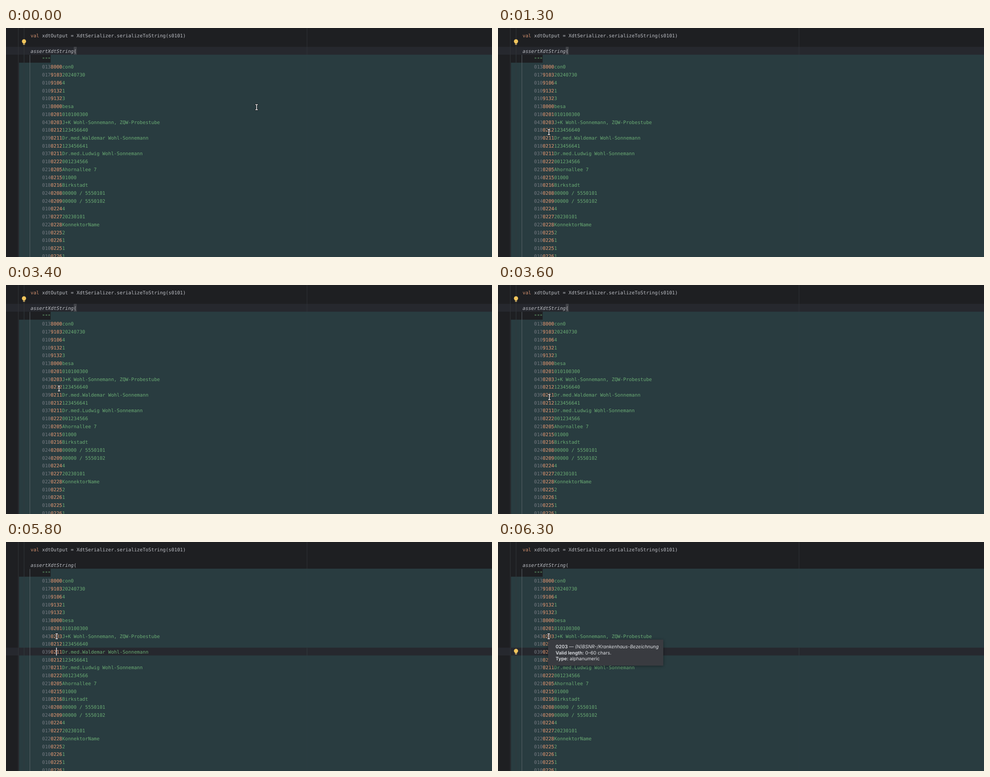
An HTML page for the animation above (8000 ms loop, 1088 by 515 pixels).

```html
<!DOCTYPE html>
<html lang="en">
<head>
<meta charset="utf-8">
<title>Editor hover</title>
<style>
  html, body { margin: 0; width: 100%; height: 100%; overflow: hidden; background: #1e1f22; }
  svg { display: block; width: 1088px; height: 515px; }
  text { white-space: pre; text-rendering: geometricPrecision; }
  #code { font: 10.69px "DejaVu Sans Mono", monospace; fill: #bcbec4; }
  #code .kw { fill: #cf8e6d; }
  #code .id { fill: #cf8e6d; stroke: #cf8e6d; stroke-width: .2; }
  #code .len { fill: #747980; }
  #code .str { fill: #6aab73; }
  #code .fn { font-style: italic; }
  #tip text { font: 10.5px Inter, sans-serif; fill: #dfe1e5; }
  #tip .b { font-weight: 600; }
  #tip .i { font-style: italic; }
</style>
</head>
<body>
<svg viewBox="0 0 1088 515">
  <defs>
    <filter id="soft" x="-10%" y="-30%" width="120%" height="160%">
      <feGaussianBlur stdDeviation="3.5"/>
    </filter>
    <path id="beam" d="M-2 -5.8H-1Q0 -5.8 0 -4.8V4.8Q0 5.8 -1 5.8H-2M2 -5.8H1Q0 -5.8 0 -4.8V4.8Q0 5.8 1 5.8H2"/>
  </defs>
  <rect width="1088" height="515" fill="#1e1f22"/>
  <path d="M100 60H1088V515H29V78H100Z" fill="#293c40"/>
  <rect id="row" width="1088" height="17.6" fill="#26282e"/>
  <g fill="none" stroke="#313438">
    <path d="M27.5 0V515M40.5 0V60M673.9 0V60"/>
    <path d="M40.5 60V515" stroke="#30393d"/>
    <path d="M673.9 60V515" stroke="#2d3f43"/>
    <path id="margin" d="M673.9 237.6V255.2"/>
    <path d="M53.5 60.5V515" stroke="#5a6267"/>
  </g>
  <rect id="brace" x="151.6" y="42.4" width="6.6" height="17.6" fill="#43454a"/>
  <g id="code"></g>
  <rect id="caret" x="112" y="237.6" width="1.8" height="17.6" fill="#ced0d6"/>
  <g id="bulb">
    <path d="M40.3 25.3a4.7 4.7 0 0 1 2.4 8.7v1.2h-4.8v-1.2a4.7 4.7 0 0 1 2.4-8.7Z" fill="#f2c55c"/>
    <path d="M38 36h4.6v.7q0 1.1-1.1 1.1h-2.4q-1.1 0-1.1-1.1Z" fill="#d8b56a"/>
  </g>
  <g id="tip">
    <rect x="112" y="221" width="258" height="58" fill="#000" opacity=".4" filter="url(#soft)"/>
    <rect x="112" y="219.5" width="258" height="58.5" fill="#393b40"/>
    <text x="129" y="238.9"><tspan class="b">0203</tspan> — <tspan class="i">(N)BSNR-/Krankenhaus-Bezeichnung</tspan></text>
    <text x="129" y="252.6"><tspan class="b">Valid length:</tspan> 0–60 chars.</text>
    <text x="129" y="266.3"><tspan class="b">Type:</tspan> alphanumeric</text>
  </g>
  <g id="mouse" fill="none" stroke-linecap="square">
    <use href="#beam" stroke="#101214" stroke-width="3.2"/>
    <use href="#beam" stroke="#fff" stroke-width="1.5"/>
  </g>
</svg>
<script>
const LOOP = 8000, STEP = 100, LEFT = 55, CHAR = 6.436, LINE = 17.72, BASE = 20.6;
const $ = id => document.getElementById(id);

const records = `0138000con0
017910320240730
01091064
01091321
01091323
0138000besa
0180201010100300
0430203J+K Wohl-Sonnemann, ZQW-Probestube
0180212123456640
0390211Dr.med.Waldemar Wohl-Sonnemann
0180212123456641
0370211Dr.med.Ludwig Wohl-Sonnemann
0180222001234566
0210205Ahornallee 7
014021501000
0180216Birkstadt
024020800000 / 5550101
024020900000 / 5550102
01002244
017022720230101
0220228KonnektorName
01002252
01002261
01002251
01002261`.split("\n");

function put(row, col, str, cls) {
  const el = document.createElementNS("http://www.w3.org/2000/svg", "text");
  el.setAttribute("x", LEFT + col * CHAR);
  el.setAttribute("y", BASE + row * LINE);
  if (cls) el.setAttribute("class", cls);
  el.textContent = str;
  $("code").append(el);
}

put(0, 0, "val", "kw");
put(0, 4, "xdtOutput = XdtSerializer.serializeToString(s0101)");
put(2, 0, "assertXdtString", "fn");
put(2, 15, "(");
put(3, 4, '"""', "str");
records.forEach((r, i) => {
  put(i + 4, 4, r.slice(0, 3), "len");
  put(i + 4, 7, r.slice(3, 7), "id");
  put(i + 4, 11, r.slice(7), "str");
});

// Pointer moves: each eases from the last place to x, y
const moves = [
  { from: 200, to: 400, x: 549, y: 180 },
  { from: 500, to: 1300, x: 114, y: 234 },
  { from: 1300, to: 1500, x: 96, y: 229 },
  { from: 1500, to: 1700, x: 120, y: 226 },
  { from: 3300, to: 3600, x: 115, y: 252 },
  { from: 5200, to: 5800, x: 113.5, y: 212 }
];

const clamp = v => Math.min(1, Math.max(0, v));
const ease = p => p * p * (3 - 2 * p);

function pointer(t) {
  let x = 561, y = 178;
  for (const m of moves) {
    const p = ease(clamp((t - m.from) / (m.to - m.from)));
    x += (m.x - x) * p;
    y += (m.y - y) * p;
  }
  return [x, y];
}

const show = (id, opacity) => $(id).setAttribute("opacity", +opacity);
const move = (id, x, y) => $(id).setAttribute("transform", `translate(${x} ${y})`);

function draw(time) {
  const t = Math.floor(time / STEP) * STEP;
  const clicked = t >= 5200, hover = t >= 6200;
  move("mouse", ...pointer(t));
  move("row", 0, clicked ? 237.6 : 42.4);
  show("margin", clicked);
  show("brace", !clicked);
  show("caret", clicked && !hover);
  show("bulb", !clicked || hover);
  move("bulb", 0, hover ? 215 : 0);
  show("tip", clamp((t - 6100) / 200));
}

const start = performance.now();
function tick() {
  draw((performance.now() - start) % LOOP);
  requestAnimationFrame(tick);
}
tick();
</script>
</body>
</html>
```
